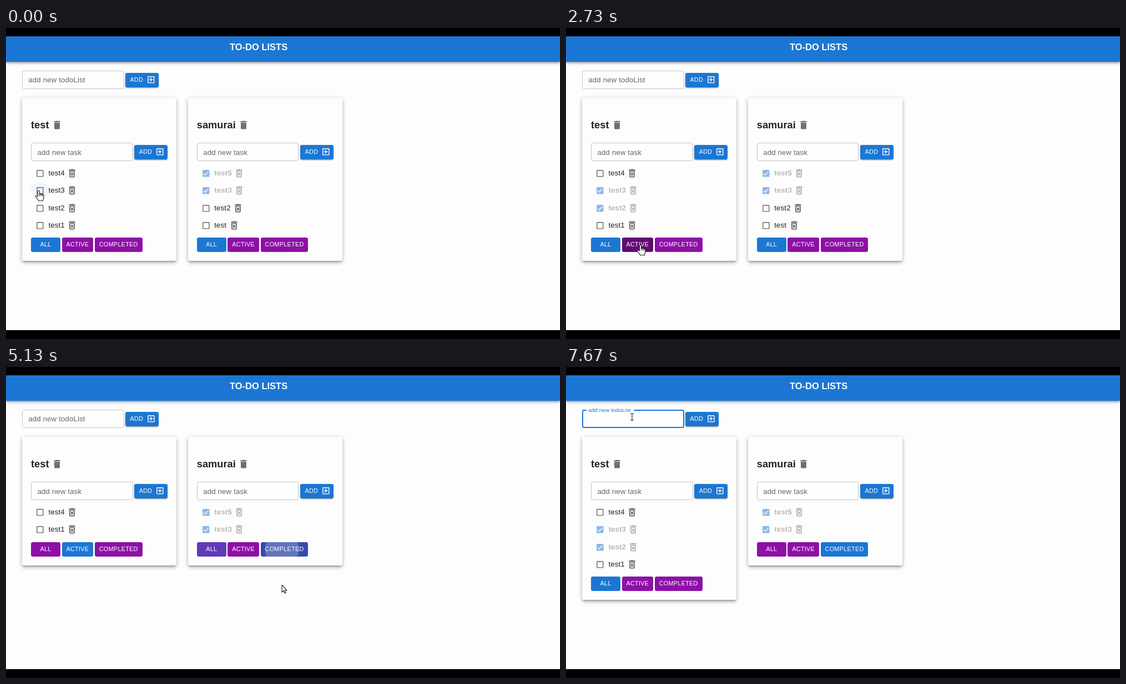
Animation, 998 px wide and 561 px high, one loop 8000 ms. Source, as an HTML page:

```html
<!DOCTYPE html>
<html lang="en">
<head>
<meta charset="utf-8">
<title>To-do lists</title>
<style>
html, body { margin: 0; width: 100%; height: 100%; overflow: hidden; background: #000; }
body { font: 13.28px/33px "Liberation Sans", Arial, sans-serif; letter-spacing: .125px; color: #212121; }
#stage { position: absolute; left: 0; top: 0; width: 998px; height: 561px; overflow: hidden; background: #fdfdfd; }
#stage div, #stage .at { position: absolute; white-space: nowrap; box-sizing: border-box; }
.bar { left: 0; width: 998px; background: #000; }
#head {
  left: 0; top: 15px; width: 998px; height: 45.6px; background: #1b77d3;
  box-shadow: 0 2px 3px -1px rgba(0,0,0,.25), 0 3px 4px rgba(0,0,0,.16), 0 1px 8px rgba(0,0,0,.14);
}
#head b { position: absolute; left: 403px; top: 0; font-size: 16.5px; line-height: 38px; color: #fff; letter-spacing: 0; }
.card {
  top: 126px; width: 278.7px; border-radius: 3.3px; background: #fdfdfd;
  box-shadow: 0 3px 3px -1px rgba(0,0,0,.22), 0 4px 7px rgba(0,0,0,.17), 0 1px 9px rgba(0,0,0,.14);
}
.field { width: 183.5px; height: 33px; border: 1px solid #c3c3c0; border-radius: 3.3px; }
.label { color: #666; transform-origin: 0 50%; }
.btn {
  height: 26px; border-radius: 3.3px; background: #1b77d3; color: #fff;
  font-size: 10.8px; line-height: 25px; letter-spacing: .31px; text-align: center;
}
.add {
  width: 60px; padding-left: 8.3px; text-align: left;
  box-shadow: 0 2px 1px -1px rgba(0,0,0,.2), 0 1.5px 2px rgba(0,0,0,.16), 0 1px 4px rgba(0,0,0,.12);
}
.name { font-size: 18.25px; font-weight: bold; letter-spacing: 0; }
.row { display: flex; align-items: center; height: 32px; line-height: 32px; }
.row svg { margin-left: 3.4px; }
.done { opacity: .5; font-weight: bold; color: #757575; }
.halo { width: 31.6px; height: 31.6px; border-radius: 50%; background: rgba(25,118,210,.06); }
svg { flex: none; overflow: visible; fill: none; stroke: #666; stroke-width: 2; }
.add svg { stroke: #fff; }
#cursor { position: absolute; left: 0; top: 0; stroke: #1a1a1a; stroke-width: 1.1; stroke-linejoin: round; }
</style>
</head>
<body>
<div id="stage">
  <div id="head"><b>TO-DO LISTS</b></div>
  <div id="page"></div>
  <svg id="cursor" width="1" height="1"></svg>
  <div class="bar" style="top:0;height:15px"></div>
  <div class="bar" style="top:545px;height:16px"></div>
</div>
<script>
const LOOP = 8000;
const CLICK = { test3: 300, test2: 1330, active: 2950, completed: 5000, all: 6450, focus: 7430 };

// time, x, y of the pointer's hot spot
const PATH = [
  [0, 59, 293], [350, 59, 293], [700, 59, 318], [1100, 59, 318], [1300, 61, 326],
  [1900, 61, 326], [2400, 134, 391], [3450, 134, 391], [4250, 497, 393], [5100, 497, 393],
  [5200, 495, 392], [5530, 495, 392], [5560, 494, 392], [5730, 494, 392], [6100, 62, 337],
  [6600, 62, 337], [7250, 119, 90], [LOOP, 119, 90]
];
const FILTERS = [['ALL', 45, 53], ['ACTIVE', 100.5, 56.7], ['COMPLETED', 160, 85.5]];
const BLUE = [27, 119, 211], DARK_BLUE = [21, 101, 192];
const PURPLE = [142, 16, 167], DARK_PURPLE = [98, 10, 116];
const SHIFT = 298.8, ROW = 31.25, FIRST = 262;

const clamp = (v) => Math.max(0, Math.min(1, v));
const ease = (u) => (1 - Math.cos(Math.PI * clamp(u))) / 2;
const lerp = (a, b, u) => a + (b - a) * u;
const rgb = (c) => `rgb(${c.map(Math.round)})`;

function pointer(t) {
  const i = Math.max(1, PATH.findIndex((p) => p[0] >= t));
  const [t0, x0, y0] = PATH[i - 1], [t1, x1, y1] = PATH[i];
  const u = ease((t - t0) / (t1 - t0));
  return [lerp(x0, x1, u), lerp(y0, y1, u)];
}

function lists(t) {
  const all = [
    { x: 0, name: 'test', filter: t >= CLICK.active && t < CLICK.all ? 1 : 0,
      tasks: [['test4', false], ['test3', t >= CLICK.test3], ['test2', t >= CLICK.test2], ['test1', false]] },
    { x: SHIFT, name: 'samurai', filter: t < CLICK.completed ? 0 : 2,
      tasks: [['test5', true], ['test3', true], ['test2', false], ['test', false]] }
  ];
  for (const l of all) {
    l.shown = l.tasks.filter(([, done]) => !l.filter || (l.filter === 2) === done);
    l.foot = FIRST + ROW * (l.shown.length - 1) + 22.3;
  }
  return all;
}

const inside = ([px, py], x, y, w, h) => px >= x && px <= x + w && py >= y && py <= y + h;
const overFilter = (p, l, k) => inside(p, l.x + FILTERS[k][1], l.foot, FILTERS[k][2], 26);
const overCheck = (p, l, i) => Math.hypot(p[0] - l.x - 61, p[1] - FIRST - ROW * i) < 15.8;

// A 250 ms colour transition is the mean of the plain colours over that span.
function filterColor(n, k, t) {
  const sum = [0, 0, 0], steps = 10;
  for (let s = 0; s < steps; s++) {
    const past = Math.max(0, t - s * 25), l = lists(past)[n];
    const over = overFilter(pointer(past), l, k);
    const c = l.filter === k ? (over ? DARK_BLUE : BLUE) : (over ? DARK_PURPLE : PURPLE);
    c.forEach((v, i) => sum[i] += v / steps);
  }
  return rgb(sum);
}

function ripple(n, k, t) {
  const start = [[CLICK.all, CLICK.active], [, , CLICK.completed]][n][k];
  const dt = t - start;
  if (!(dt >= 0 && dt < 700)) return '';
  const alpha = .25 * clamp(dt / 150) * clamp((700 - dt) / 550);
  const x = pointer(start)[0] - FILTERS[k][1] - n * SHIFT, r = 100 * ease(dt / 350);
  const white = `rgba(255,255,255,${alpha.toFixed(3)})`;
  return `;background-image:radial-gradient(circle at ${x}px 13px,${white} ${r}px,transparent ${r}px)`;
}

const icon = (size, body, extra = '') =>
  `<svg width="${size}" height="${size}" viewBox="0 0 24 24" ${extra}>${body}</svg>`;
const at = (x, y) => `class="at" style="left:${x}px;top:${y}px"`;
const div = (cls, x, y, style = '', body = '') =>
  `<div class="${cls}" style="left:${x}px;top:${y}px;${style}">${body}</div>`;

const FRAME = '<rect x="4" y="4" width="16" height="16" rx="1"/>';
const PLUS = FRAME + '<path d="M12 7v10M7 12h10"/>';
const TICK = '<rect x="3" y="3" width="18" height="18" rx="2" fill="#1976d2" stroke="none"/>' +
  '<path d="M5.7 12.2l4.3 4.1 8.3-8.9" stroke="#fff"/>';
const BIN = '<path fill="#6e706d" stroke="none" d="M6 7h12v12q0 2-2 2H8q-2 0-2-2zM5 4h3.5l1-1h5l1 1H19v2H5z"/>';
const CROSS_BIN = '<path d="M7 8h10v11q0 1-1 1H8q-1 0-1-1zM5 5h14M9 4h6M9.2 11.2l5.6 5.6m0-5.6l-5.6 5.6"/>';

const addButton = (x, y) => div('btn add', x, y, '', 'ADD' + icon(16.6, PLUS, at(37.7, 4.4)));
const field = (x, y, over) => div('field', x, y, over ? 'border-color:#333' : '');

function newListField(t, p) {
  const u = ease((t - CLICK.focus) / 200), on = u > 0;
  const color = rgb(BLUE.map((v) => lerp(102, v, u)));
  const over = inside(p, 29, 77, 183, 33);
  const edge = on ? 'border:2px solid #1b77d3' : over ? 'border-color:#333' : '';
  return div('field', 29, 77, edge) +
    (on ? div('', 37, 76, `width:${84.5 * u}px;height:4px;background:#fdfdfd`) : '') +
    div('label', 40.3, lerp(77.3, 60.6, u), `color:${color};transform:scale(${lerp(1, .75, u)})`, 'add new todoList');
}

function card(l, n, t, p) {
  const X = (x) => l.x + x;
  let out = div('card', X(28.8), 126, `height:${l.foot + 42.2 - 126}px`) +
    div('name', X(45), 157.5, '', l.name) +
    icon(19.92, BIN, at(n ? 418 : 82.2, 165.2)) +
    field(X(45), 207.3, inside(p, X(45), 207, 183, 33)) +
    div('label', X(56.5), 207.5, '', 'add new task') +
    addButton(X(231.4), 211);
  l.shown.forEach(([text, done], i) => {
    const y = FIRST + ROW * i;
    if (overCheck(p, l, i)) out += div('halo', X(45.2), y - 15.5);
    out += div(done ? 'done' : '', X(52.7), y - 16, 'height:32px',
      icon(16.6, done ? TICK : FRAME, at(0, 8.1)) +
      div('row', 23.8, 0, '', `<span>${text}</span>` + icon(19.92, CROSS_BIN)));
  });
  FILTERS.forEach(([text, x, w], k) => {
    out += div('btn', X(x), l.foot, `width:${w}px;background-color:${filterColor(n, k, t)}${ripple(n, k, t)}`, text);
  });
  return out;
}

const CURSORS = {
  arrow: '<path fill="#fff" d="M.5.5v13l3-2.7 2 4.6 2-.9-2-4.4h4z"/>',
  hand: '<path fill="#fff" d="M-1.5 11V1.7a1.5 1.5 0 0 1 3 0V7a1.4 1.4 0 0 1 2.7.3a1.3 1.3 0 0 1 2.5.5' +
    'a1.2 1.2 0 0 1 2.2 1v4c0 2-1.5 3-1.5 6H-.5c0-2-3-4-5-7.5c-.8-1.6 1-2.6 2.2-1.3z"/>' +
    '<path d="M1.5 7v3M4.2 7.3v3M6.7 7.8v2.6"/>',
  text: '<path d="M-3-6h2q1 0 1 1V5q0 1-1 1h-2M3-6H1q-1 0-1 1V5q0 1 1 1h2"/>'
};

function cursorKind(p, all) {
  for (const l of all) {
    if (l.shown.some((_, i) => overCheck(p, l, i))) return 'hand';
    if (FILTERS.some((_, k) => overFilter(p, l, k))) return 'hand';
    if (inside(p, l.x + 45, 207, 183, 33)) return 'text';
  }
  return inside(p, 29, 77, 183, 33) ? 'text' : 'arrow';
}

const page = document.getElementById('page');
const cursor = document.getElementById('cursor');
let lastPage, lastKind;

function render(t) {
  const p = pointer(t), all = lists(t);
  const html = newListField(t, p) + addButton(215, 81) + all.map((l, n) => card(l, n, t, p)).join('');
  if (html !== lastPage) page.innerHTML = lastPage = html;
  const kind = cursorKind(p, all);
  if (kind !== lastKind) cursor.innerHTML = CURSORS[lastKind = kind];
  cursor.style.transform = `translate(${p[0]}px,${p[1]}px)`;
}

const begin = performance.now();
function tick() {
  render((performance.now() - begin) % LOOP);
  requestAnimationFrame(tick);
}
tick();
</script>
</body>
</html>
```
